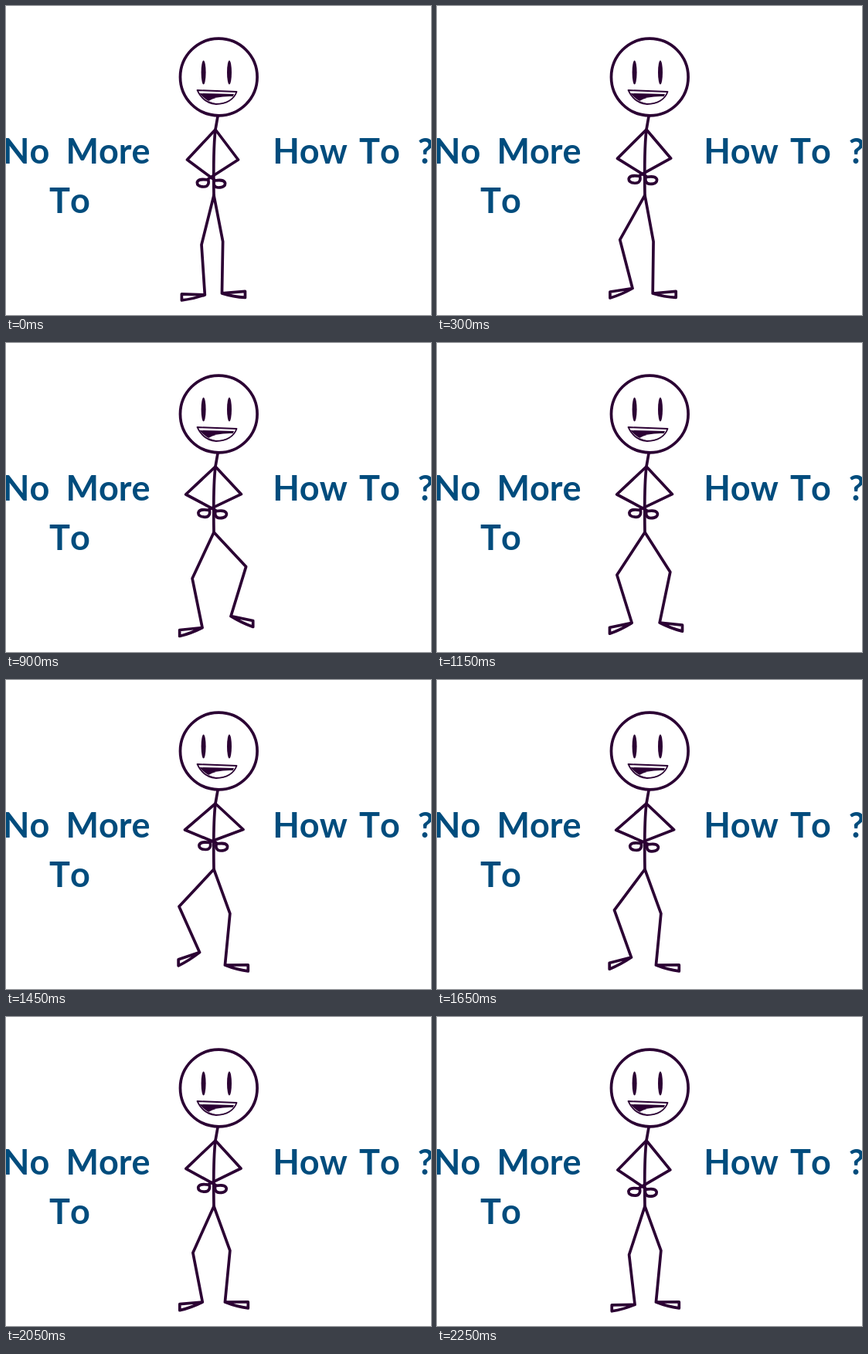
These frames come from a looping animation (550 px wide and 400 px high, 2500 ms). An HTML page:

```html
<!DOCTYPE html>
<html lang="en">
<head>
<meta charset="utf-8">
<title>No More How To</title>
<style>
  html, body { margin: 0; width: 100%; height: 100%; overflow: hidden; background: #fff; }
  svg { display: block; width: 550px; height: 400px; }
  .ink { fill: none; stroke: #2b0033; stroke-width: 3.7; stroke-linecap: round; stroke-linejoin: round; }
  .dark { fill: #2b0033; }
  text {
    font: 700 45px Lato, "Open Sans", sans-serif; font-kerning: none;
    text-anchor: middle; fill: #004c7d;
  }
</style>
</head>
<body>
<svg viewBox="0 0 550 400">
  <text x="26" y="204">No</text>
  <text x="132" y="204">More</text>
  <text x="82.5" y="268">To</text>
  <text x="393.5" y="204">How</text>
  <text x="483.5" y="204">To</text>
  <text x="543" y="204">?</text>

  <circle class="ink" cx="275.3" cy="92" r="49.8"/>
  <ellipse class="dark" cx="255.600" cy="86" rx="3" ry="15.500"/>
  <ellipse class="dark" cx="289" cy="86" rx="3" ry="15.500"/>
  <path class="dark" d="M250 113L295 114Q291 126 272 126Q262 126 250 113Z"/>
  <path fill="#fff" d="M262 123Q272 116 295 117Q288 126 272 126.500Z"/>
  <path class="ink" style="stroke-width:1.8" d="M247.500 109L298.500 111C295 121 285 127 272 127C260 126 252 119 247.500 109Z"/>

  <path class="ink" d="M274 143L271 160Q268 185 269 245"/>
  <path class="ink" id="limbs"/>
</svg>
<script>
const STEP = 50, LOOP = 2500;

// Key points as [time, value]: thigh swing in degrees, arm raise from 0 to 1
const leftSwing = [[0, 14], [550, 42], [900, 25], [1450, 43], [2250, 18]];
const rightSwing = [[0, 11], [550, 10], [900, 43], [1450, 20]];
const armRaise = [[0, 0], [550, .6], [1150, .6], [1450, 1], [1850, .88], [2250, .2]];

function valueAt(keys, t) {
  const next = keys.findIndex(([time]) => time > t);
  if (next < 0) return keys.at(-1)[1];
  const [t0, v0] = keys[next - 1], [t1, v1] = keys[next];
  return v0 + (v1 - v0) * (t - t0) / (t1 - t0);
}

// side: 1 opens to the right, -1 to the left
function arm([ex, ey], [hx, hy], side) {
  const at = (x, y) => `${hx + x * side} ${hy + y} `;
  return `M271 160L${ex} ${ey}L${at(-7.5, -5)}` +
    `C${at(-9, 0)}${at(-8, 5)}${at(-2, 5)}` +
    `C${at(5, 5)}${at(7, 2)}${at(6.5, -1)}` +
    `C${at(5, -5)}${at(0, -5)}${at(-7, -4)}`;
}

// The shin folds back as the thigh swings out; the foot stays square to the shin
function leg(swing, side, thigh, shin, fold, rest) {
  const a = swing * Math.PI / 180;
  const b = (swing * fold - rest) * Math.PI / 180;
  const kx = 269 + side * thigh * Math.sin(a), ky = 245 + thigh * Math.cos(a);
  const ax = kx - side * shin * Math.sin(b), ay = ky + shin * Math.cos(b);
  const tx = ax + side * 30 * Math.cos(b), ty = ay + 30 * Math.sin(b) + 1;
  return `M269 245L${kx} ${ky}L${ax} ${ay}L${tx} ${ty - 4}v8` +
    `Q${(ax + tx) / 2} ${(ay + ty) / 2 + 4} ${ax} ${ay}`;
}

const limbs = document.getElementById("limbs");

function draw(now) {
  const t = Math.floor(now % LOOP / STEP) * STEP;
  const r = valueAt(armRaise, t);
  limbs.setAttribute("d",
    arm([234.5 - 3 * r, 199 - 5 * r], [277 + 3 * r, 230 - 14 * r], 1) +
    arm([300.5 + 6.5 * r, 199 - 5.5 * r], [254 + 2.5 * r, 229 - 14.5 * r], -1) +
    leg(valueAt(leftSwing, t), -1, 66, 65, .7, 6) +
    leg(valueAt(rightSwing, t), 1, 61, 67, .5, 4.5));
}

const start = performance.now();
function tick() {
  draw(performance.now() - start);
  requestAnimationFrame(tick);
}
tick();
</script>
</body>
</html>
```
